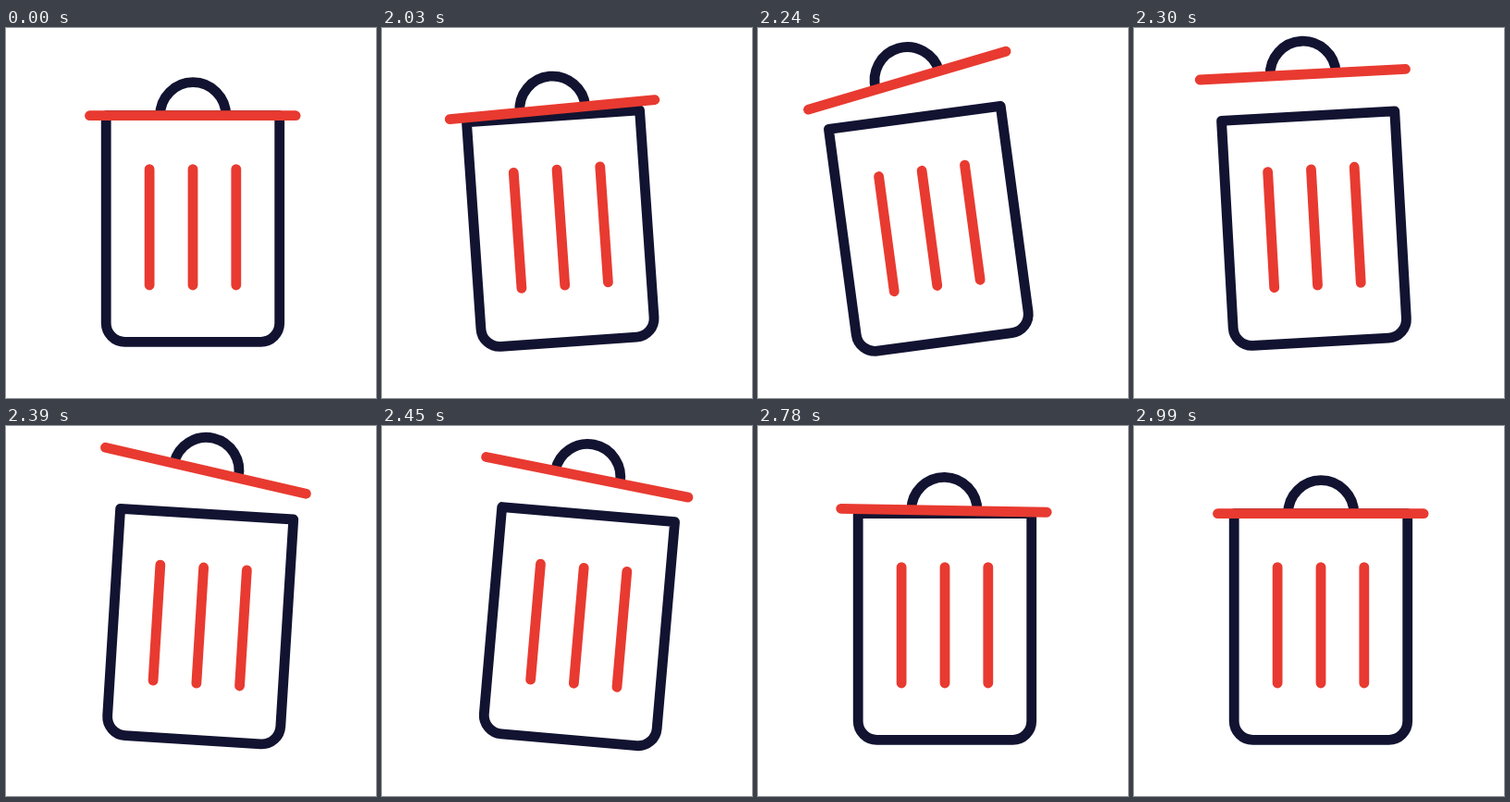
Write an HTML page that moves like this. It is 400x400 px and loops after 3050 ms.

```html
<!DOCTYPE html>
<html lang="en">
<head>
<meta charset="utf-8">
<title>Trash bin</title>
<style>
  html, body { margin: 0; width: 100%; height: 100%; overflow: hidden; background: #fff; }
  svg { display: block; width: 100%; height: 100%; }
  path { fill: none; stroke-width: 10.8; stroke-linejoin: round; }
  .navy { stroke: #121331; }
  .red { stroke: #e83a30; stroke-linecap: round; }
</style>
</head>
<body>
<svg viewBox="0 0 400 400">
  <g id="bin">
    <path class="navy" d="M108.2 94.7H295.7V319a20.3 20.3 0 0 1-20.3 20.3H128.5a20.3 20.3 0 0 1-20.3-20.3Z"/>
    <path class="red" d="M155.1 152.6V278M202 152.6V278M248.8 152.6V278"/>
    <g id="lid">
      <path class="navy" d="M166.6 94.7a35.6 36 0 0 1 71.2 0"/>
      <path class="red" d="M90.5 94.7H313.1"/>
    </g>
  </g>
</svg>
<script>
const LOOP = 3050, START = 2000, STEP = 30, END = 33;

// Cubic Bézier easing, solved by bisection.
function bezier(x1, y1, x2, y2) {
  const at = (a, b, s) => 3 * s * (1 - s) * ((1 - s) * a + s * b) + s ** 3;
  return p => {
    let lo = 0, hi = 1;
    for (let i = 0; i < 24; i++) {
      const mid = (lo + hi) / 2;
      if (at(x1, x2, mid) < p) lo = mid; else hi = mid;
    }
    return at(y1, y2, lo);
  };
}

const linear = p => p;
const quadOut = p => 1 - (1 - p) ** 2;
const cubicOut = p => 1 - (1 - p) ** 3;
const swing = p => (1 - Math.cos(Math.PI * p)) / 2;
const softStart = bezier(.33, .2, .67, 1);
const settle = bezier(.2, 0, .18, 1);

// Each leg runs from the previous value to [end step, value, easing].
const track = (...legs) => k => {
  let from = 0, value = 0;
  for (const [to, next, ease] of legs) {
    if (k < to) return value + (next - value) * ease((k - from) / (to - from));
    from = to;
    value = next;
  }
  return value;
};

const SWAY = 6.5;
const tilt = track([6, -9.4, cubicOut], [14.8, 5, swing], [18, 0, swing]);
const lift = track([12.5, 47, quadOut], [END, 0, settle]);
const drift = track([18, -5.6, linear], [END, 0, settle]);
const rock = track(
  [SWAY, -11.4, softStart], [2 * SWAY, 9.4, swing], [3 * SWAY, -4.8, swing],
  [4 * SWAY, 1, swing], [END, 0, swing]);

const bin = document.getElementById("bin");
const lid = document.getElementById("lid");

function draw(now) {
  const k = Math.max(0, Math.floor((now % LOOP - START) / STEP + 1e-6));
  bin.setAttribute("transform", `rotate(${tilt(k)} 202 340)`);
  lid.setAttribute("transform", `translate(${drift(k)} ${-lift(k)}) rotate(${rock(k)} 201.8 94.7)`);
}

const begin = performance.now();
function frame() {
  draw(performance.now() - begin);
  requestAnimationFrame(frame);
}
frame();
</script>
</body>
</html>
```
